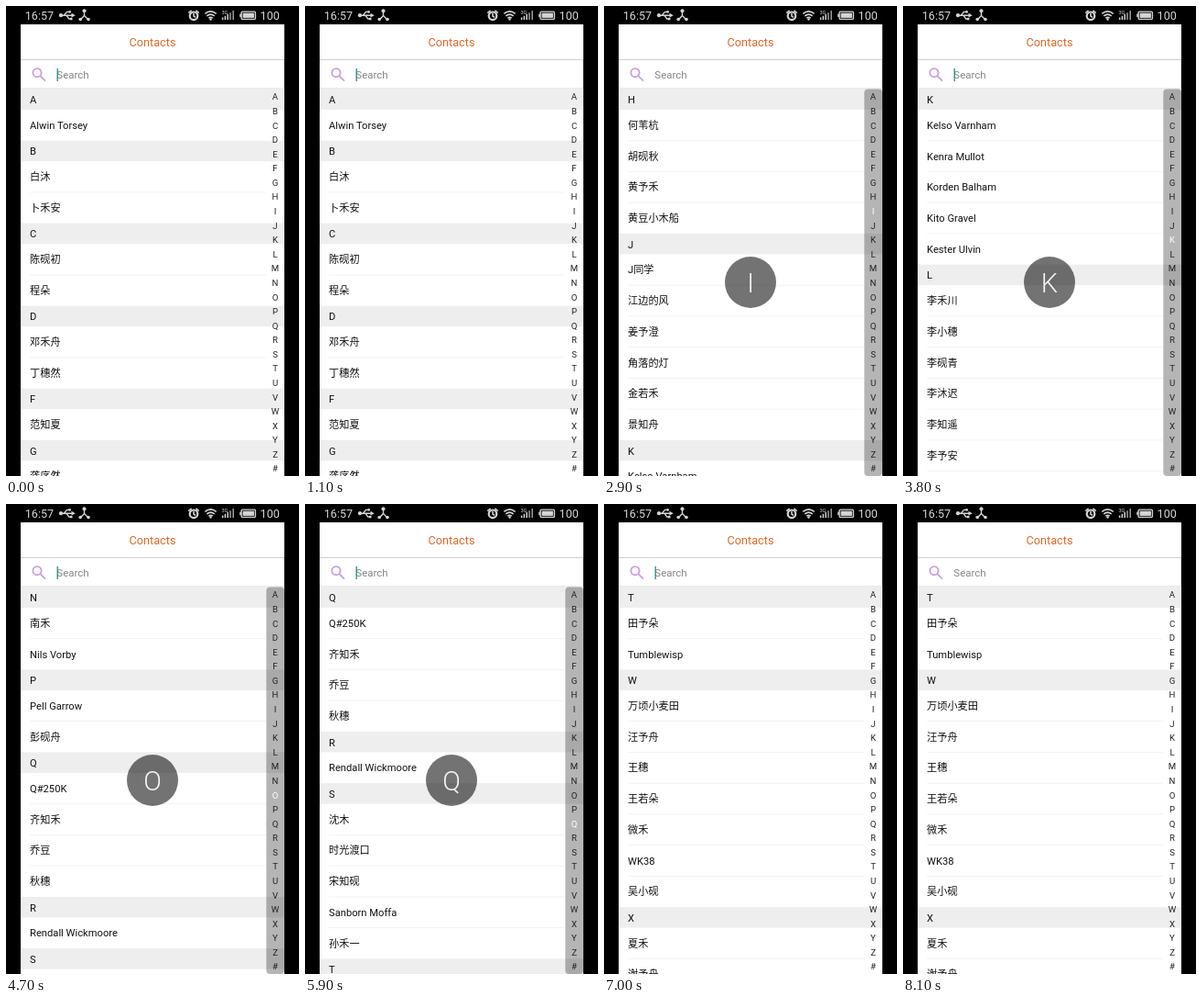
Recreate the animation shown at these times as an HTML page. Size 320x512 px, loop 8500 ms.

```html
<!DOCTYPE html>
<html lang="zh-CN">
<head>
<meta charset="utf-8">
<title>Contacts</title>
<style>
html, body { margin: 0; width: 100%; height: 100%; overflow: hidden; background: #000; }
svg { display: block; width: 320px; height: 512px; }
text { font-family: Roboto, "Noto Sans CJK SC", "Noto Sans CJK", sans-serif; font-size: 11.2px; fill: #111; }
.status { font-size: 12.6px; fill: #d4d4d4; }
.title { font-size: 12.7px; fill: #e0672b; text-anchor: middle; }
.hint { font-size: 11.5px; fill: #858585; }
.index text { font-size: 9.6px; text-anchor: middle; fill: #222; }
.big { font-size: 29px; font-weight: 300; text-anchor: middle; fill: #f4f4f4; }
.head { fill: #eee; }
.rule { fill: #f2f2f2; }
</style>
</head>
<body>
<svg viewBox="0 0 320 512">
  <defs><clipPath id="page"><rect x="16" y="90" width="288" height="422"/></clipPath></defs>
  <rect width="320" height="512"/>
  <rect x="16" y="20" width="288" height="492" fill="#fff"/>

  <g clip-path="url(#page)"><g id="list"></g></g>

  <rect x="16" y="58" width="288" height="32.4" fill="#fff"/>
  <path d="M16 58.5H303.5V89.9H16" fill="none" stroke="#dcdcdc"/>
  <path d="M16 58.5H304" stroke="#cfcfcf"/>
  <g fill="none" stroke="#c8a2dc" stroke-width="1.9">
    <circle cx="34" cy="72.7" r="4.6"/><path d="M37.4 76.1L43 81.6"/>
  </g>
  <text class="hint" x="55.3" y="79.2">Search</text>
  <rect id="caret" x="55.6" y="68" width="1.2" height="14" fill="#138878"/>
  <text class="title" x="160" y="44.1">Contacts</text>

  <text class="status" x="20.8" y="14.8">16:57</text>
  <text class="status" x="277.6" y="14.8">100</text>
  <g fill="none" stroke="#d4d4d4" stroke-width="1.4">
    <path d="M60 10.2H72M63.5 10L66.5 6.4H69M66 10.4L68.8 14H71"/>
    <path d="M85.5 5V10.5L81.2 15M85.5 10.5L90 15"/>
    <circle cx="205" cy="10.8" r="4.3" stroke-width="2.2"/>
    <path d="M205 8V11L207 12.3M199.3 7.6L202.6 4.9M210.7 7.6L207.4 4.9" stroke-width="1.6"/>
    <path d="M217.3 8.4Q223.5 3.2 229.7 8.4M219.3 10.9Q223.5 7.4 227.7 10.9M221.3 13.2Q223.5 11.4 225.7 13.2" stroke-width="1.6"/>
    <path d="M236.6 15V12.6M239.4 15V10.8M242.2 15V9" stroke-width="1.5"/>
    <path d="M245 15V7.2M248.2 15V5" stroke="#a0a0a0" stroke-width="1.5"/>
    <rect x="257.1" y="6.1" width="15.3" height="8.3" rx="1.2"/>
  </g>
  <g fill="#d4d4d4">
    <circle cx="60" cy="10.2" r="2.1"/><path d="M71.5 7.8L75.8 10.2L71.5 12.6Z"/>
    <circle cx="69.6" cy="6.4" r="1.4"/><rect x="70" y="12.8" width="2.5" height="2.5"/>
    <circle cx="85.5" cy="5.2" r="2"/><circle cx="81.2" cy="14.5" r="1.8"/><circle cx="90" cy="14.5" r="1.8"/>
    <circle cx="223.5" cy="14.5" r="1.2"/>
    <rect x="258.6" y="7.6" width="12.3" height="5.3"/><rect x="255.2" y="8.6" width="1.6" height="3.4"/>
    <text class="status" x="235.4" y="8.6" style="font-size:5.6px">3G</text>
  </g>

  <rect id="track" x="284.3" y="90.4" width="19.7" height="421.6" rx="4" fill="#000" fill-opacity=".29"/>
  <g id="index" class="index"></g>
  <g id="bubble">
    <circle cx="160" cy="301" r="28" fill="#000" fill-opacity=".55"/>
    <text id="big" class="big" x="160" y="311.8"></text>
  </g>
</svg>
<script>
const LOOP = 8500, TOP = 90.4, HEAD = 22.5, ROW = 33.75;

const contacts = {
  A: 'Alwin Torsey',
  B: '白沐,卜禾安',
  C: '陈砚初,程朵',
  D: '邓禾舟,丁穗然',
  F: '范知夏',
  G: '龚序然',
  H: '何苇杭,胡砚秋,黄予禾,黄豆小木船',
  J: 'J同学,江边的风,姜予澄,角落的灯,金若禾,景知舟',
  K: 'Kelso Varnham,Kenra Mullot,Korden Balham,Kito Gravel,Kester Ulvin',
  L: '李禾川,李小穗,李砚青,李沐迟,李知遥,李予安,林溪禾,陆朵,罗青砚',
  M: '马禾,莫砚秋,穆小舟,Morvin Tace',
  N: '南禾,Nils Vorby',
  P: 'Pell Garrow,彭砚舟',
  Q: 'Q#250K,齐知禾,乔豆,秋穗',
  R: 'Rendall Wickmoore',
  S: '沈木,时光渡口,宋知砚,Sanborn Moffa,孙禾一',
  T: '田予朵,Tumblewisp',
  W: '万顷小麦田,汪予舟,王穗,王若朵,微禾,WK38,吴小砚',
  X: '夏禾,谢予舟'
};

// [time, letter under the finger]; an empty letter means no touch
const touches = [[0, ''], [1600, 'E'], [1700, 'F'], [2100, 'G'], [2400, 'H'], [2900, 'I'],
  [3100, 'J'], [3600, 'K'], [4000, 'L'], [4400, 'M'], [4600, 'N'], [4700, 'O'], [5100, 'P'],
  [5500, 'Q'], [6000, 'R'], [6600, 'S'], [6700, 'T'], [6800, '']];

// the caret starts visible and flips at each of these times
const blinks = [600, 1100, 1600, 2100, 2600, 3100, 3400, 3800, 4100, 4600, 5100, 5600,
  6300, 7000, 7100, 7600, 8100];

const $ = id => document.getElementById(id);

function add(parent, tag, attrs, text = '') {
  const el = document.createElementNS('http://www.w3.org/2000/svg', tag);
  for (const key in attrs) el.setAttribute(key, attrs[key]);
  el.textContent = text;
  parent.appendChild(el);
  return el;
}

const offsets = {};

function buildList() {
  const list = $('list');
  let y = TOP;
  for (const [letter, names] of Object.entries(contacts)) {
    offsets[letter] = y - TOP;
    add(list, 'rect', { class: 'head', x: 16, y, width: 288, height: HEAD });
    add(list, 'text', { x: 26, y: y + 15.6 }, letter);
    y += HEAD;
    names.split(',').forEach((name, i) => {
      if (i) add(list, 'rect', { class: 'rule', x: 26, y: y - 0.5, width: 258, height: 1 });
      add(list, 'text', { x: 26, y: y + 21 }, name);
      y += ROW;
    });
  }
}

const letters = [...'ABCDEFGHIJKLMNOPQRSTUVWXYZ#'];
let marks;

function buildIndex() {
  marks = letters.map((letter, i) =>
    add($('index'), 'text', { x: 294, y: 102.4 + i * 15.58 }, letter));
}

function show(id, on) {
  $(id).style.display = on ? '' : 'none';
}

function draw(time) {
  let current = '', section = 'A';
  for (const [start, letter] of touches) {
    if (start > time) break;
    current = letter;
    if (letter in offsets) section = letter;
  }
  $('list').setAttribute('transform', `translate(0 ${-offsets[section]})`);
  show('track', current);
  show('bubble', current);
  $('big').textContent = current;
  marks.forEach((mark, i) => { mark.style.fill = letters[i] === current ? '#fff' : ''; });
  show('caret', blinks.filter(t => t <= time).length % 2 === 0);
}

buildList();
buildIndex();
const began = performance.now();

function tick() {
  draw((performance.now() - began) % LOOP);
  requestAnimationFrame(tick);
}
tick();
</script>
</body>
</html>
```
